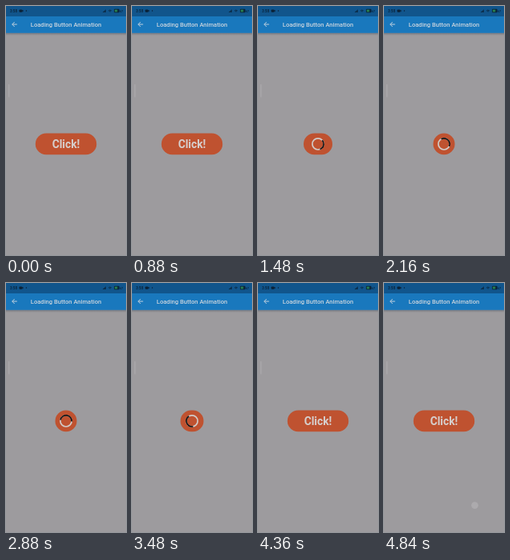
An HTML page with a canvas for the animation above (4.96 s loop, 150x312 px).

```html
<!DOCTYPE html>
<html lang="en">
<head>
<meta charset="utf-8">
<title>Loading Button Animation</title>
<style>
  html, body { margin: 0; width: 100%; height: 100%; overflow: hidden; background: #9d9b9e; }
  canvas { display: block; width: 150px; height: 312px; }
</style>
</head>
<body>
<canvas id="stage"></canvas>
<script>
const W = 150, H = 312, LOOP = 4960;
const TAU = Math.PI * 2;
const FONT = 'Roboto, Arial, sans-serif';
const canvas = document.getElementById('stage');
const ctx = canvas.getContext('2d');
const ratio = window.devicePixelRatio || 1;
canvas.width = W * ratio;
canvas.height = H * ratio;
ctx.scale(ratio, ratio);

const clamp = v => Math.max(0, Math.min(1, v));

// Button timing in ms and geometry in px
const WIDE = 76.4, SMALL = 27, MORPH = 735;
const SHRINK = 1163, GROW = 3229;
const SPIN_FROM = 1270, SPIN_TO = 3755;
const MID = { x: 75, y: 172.9 };

// Cubic Bezier (0.4, 0, 0.2, 1)
function fastOutSlowIn(x) {
  let lo = 0, hi = 1;
  for (let i = 0; i < 20; i++) {
    const s = (lo + hi) / 2, r = 1 - s;
    if (1.2 * r * r * s + 0.6 * r * s * s + s ** 3 < x) lo = s; else hi = s;
  }
  return 3 * (1 - lo) * lo * lo + lo ** 3;
}

function rect(x, y, w, h, color) {
  ctx.fillStyle = color;
  ctx.fillRect(x, y, w, h);
}

function pill(x, y, w, h, r, color) {
  ctx.fillStyle = color;
  ctx.beginPath();
  ctx.roundRect(x, y, w, h, r);
  ctx.fill();
}

function disc(x, y, r, color) {
  ctx.fillStyle = color;
  ctx.beginPath();
  ctx.arc(x, y, r, 0, TAU);
  ctx.fill();
}

function arc(x, y, r, from, to, width, color) {
  ctx.strokeStyle = color;
  ctx.lineWidth = width;
  ctx.beginPath();
  ctx.arc(x, y, r, from, to);
  ctx.stroke();
}

function label(text, x, y, font, color, align = 'left') {
  ctx.font = font + ' ' + FONT;
  ctx.fillStyle = color;
  ctx.textAlign = align;
  ctx.fillText(text, x, y);
}

function statusBar() {
  const ink = '#0a2136';
  rect(0, 0, W, 13, '#11558c');
  label('3:58', 5, 7.8, '500 4.6px', ink);
  pill(16.5, 4.4, 3.8, 3.4, 0.8, ink);
  rect(20.3, 5, 1.2, 2.2, ink);
  disc(25.4, 6, 0.7, ink);
  for (let i = 0; i < 4; i++) rect(121 + i * 1.1, 7 - i * 0.8, 0.7, 1 + i * 0.8, ink);
  for (const r of [1.2, 2.6]) arc(130, 7.8, r, -Math.PI * 0.78, -Math.PI * 0.22, 0.8, ink);
  pill(135, 3.8, 6.6, 4.4, 1, ink);
  rect(135.8, 4.6, 3.5, 2.8, '#277f52');
  label('67', 142, 7.6, '500 3.6px', ink);
}

function appBar() {
  rect(0, 13, W, 20.8, '#1978bd');
  ctx.strokeStyle = '#c3d2df';
  ctx.lineWidth = 1;
  ctx.beginPath();
  ctx.moveTo(13.8, 23);
  ctx.lineTo(7.8, 23);
  ctx.moveTo(10.7, 20);
  ctx.lineTo(7.7, 23);
  ctx.lineTo(10.7, 26);
  ctx.stroke();
  label('Loading Button Animation', 75, 25.7, '500 7.6px', '#c9d4de', 'center');
}

function page() {
  rect(0, 0, W, H, '#9d9b9e');
  const shade = ctx.createLinearGradient(0, 33.5, 0, 37);
  shade.addColorStop(0, 'rgba(50,60,75,.4)');
  shade.addColorStop(1, 'rgba(50,60,75,0)');
  rect(0, 33.5, W, 4, shade);
  pill(3, 98, 1.4, 16.5, 0.7, '#aaa8ab');
  statusBar();
  appBar();
}

// Indeterminate ring: the head runs ahead, then the tail catches up
function spinner(age) {
  const phase = age % 1333 / 1333;
  const head = fastOutSlowIn(clamp(phase * 2)) * 0.75;
  const tail = fastOutSlowIn(clamp(phase * 2 - 1)) * 0.75;
  const start = (tail - 0.25 + age / 2222 + phase / 4) * TAU;
  arc(MID.x, MID.y, 7.1, 0, TAU, 1.7, '#d1cbc8');
  arc(MID.x, MID.y, 7.1, start, start + Math.max(0.001, head - tail) * TAU, 1.7, '#15100f');
}

function buttonWidth(t) {
  const u = t < GROW ? 1 - clamp((t - SHRINK) / MORPH) : clamp((t - GROW) / MORPH);
  return SMALL + (WIDE - SMALL) * u ** 3;
}

function button(t) {
  const w = buttonWidth(t);
  pill(MID.x - w / 2, 159.6, w, 26.6, 13.3, '#bf5230');
  if (t >= SPIN_FROM && t < SPIN_TO) spinner(t - SPIN_FROM);
  else label('Click!', MID.x, 177.7, 'bold 13.8px', '#d6cfcd', 'center');
}

function touch(t) {
  const a = clamp((t - 4600) / 240);
  if (a > 0) disc(113.5, 278.6, 4.4, `rgba(190,189,191,${0.45 * a})`);
}

function frame(now) {
  const t = now % LOOP;
  page();
  button(t);
  touch(t);
  requestAnimationFrame(frame);
}
requestAnimationFrame(frame);
</script>
</body>
</html>
```
